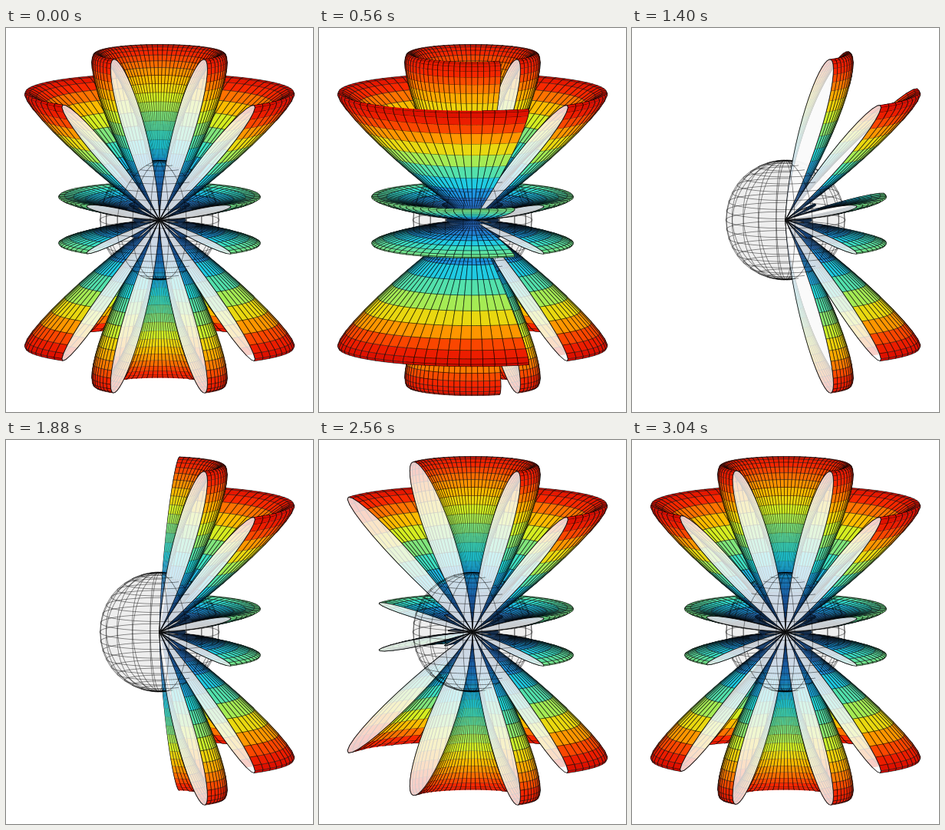
A matplotlib script that plays this animation: 400 px wide and 500 px high, repeating every 3.08 s.

```python
import numpy as np
import matplotlib.pyplot as plt
from matplotlib.animation import FuncAnimation
from matplotlib.collections import PathCollection
from matplotlib.colors import LinearSegmentedColormap
from matplotlib.patches import Circle
from matplotlib.path import Path

# Directivity of a 4.4 wavelength dipole, swept around its axis.
LENGTH = 4.4
SCALE = 74.9
SPHERE = 78
TILT = np.radians(8)
START = 45
SLICES = 71
STEP = 360 / SLICES
FRAMES = 77
RESTART = 24

CMAP = LinearSegmentedColormap.from_list("gain", [
    (0, "#2458a8"), (.2, "#2470c4"), (.32, "#1c9fe8"), (.42, "#22dce0"),
    (.55, "#74e58a"), (.66, "#d2f024"), (.75, "#fcc400"), (.83, "#ff8000"),
    (.91, "#f82800"), (1, "#d80c00")])


def gain(theta):
    t = np.clip(np.radians(theta), 1e-4, np.pi - 1e-4)
    k = np.pi * LENGTH
    return ((np.cos(k * np.cos(t)) - np.cos(k)) / np.sin(t)) ** 2


def project(r, theta, phi):
    """Spherical to screen; phi = 0 points at the viewer, 90 to the right."""
    t, p = np.radians(theta), np.radians(phi)
    rho, z = r * np.sin(t), r * np.cos(t)
    x = rho * np.sin(p)
    y = z * np.cos(TILT) - rho * np.cos(p) * np.sin(TILT)
    return np.stack(np.broadcast_arrays(x, y), axis=-1)


def wrap(angle):
    return np.abs((angle + 180) % 360 - 180)


def fan_key(theta, phi):
    """Angle to the viewer inside the half plane at phi."""
    p = np.radians(phi)
    view = np.degrees(np.arctan2(np.cos(p) * np.cos(TILT), np.sin(TILT)))
    return wrap(theta - view)


def in_minor_lobe(deg):
    return any(abs(deg - c) < 6 for c in (63, 90, 117))


# Lobe surface, coarser where the lobes are tiny
theta = np.array([d for i, d in enumerate(np.linspace(0, 180, 251))
                  if i % 2 == 0 or not in_minor_lobe(d)])
phi = START + STEP * np.arange(SLICES + 1)
radius = gain(theta)
peak = gain(np.linspace(1, 179, 2000)).max()
grid = project(SCALE * radius[:, None], theta[:, None], phi[None, :])
rows = len(theta) - 1

quads = np.stack([grid[:-1, :-1], grid[1:, :-1], grid[1:, 1:], grid[:-1, 1:]], axis=2)
d1 = quads[:, :, 2] - quads[:, :, 0]
d2 = quads[:, :, 3] - quads[:, :, 1]
outward = (d1[..., 0] * d2[..., 1] - d1[..., 1] * d2[..., 0] > 0).ravel()

mid_theta = (theta[1:] + theta[:-1]) / 2
mid_phi = phi[:-1] + STEP / 2
mid_radius = (radius[1:] + radius[:-1]) / 2
face_theta = np.repeat(mid_theta, SLICES)
face_phi = np.tile(mid_phi, rows)
face_slice = np.tile(np.arange(SLICES), rows)
face_rgba = np.repeat(CMAP(mid_radius / peak), SLICES, axis=0)
face_paths = [Path(q) for q in quads.reshape(-1, 4, 2)]

# Mesh lines fade where the cells get narrow
width = SCALE * mid_radius * np.sin(np.radians(mid_theta)) * np.radians(STEP)
face_edge = np.repeat(.68 * np.clip(width / 5, .1, 1), SLICES)

# Wire sphere, cut into short pieces
pieces = []
for m in range(20):
    for t in np.arange(0, 180, 4.5):
        pieces.append((t, t + 4.5, START + 18 * m, START + 18 * m))
for t in np.arange(9, 180, 9):
    for p in np.arange(0, 360, 9):
        pieces.append((t, t, START + p, START + p + 9))
t0, t1, p0, p1 = np.array(pieces).T
wire_paths = [Path(s) for s in np.stack([project(SPHERE, t0, p0),
                                         project(SPHERE, t1, p1)], axis=1)]
wire_theta = (t0 + t1) / 2
wire_dir = (p0 + p1) / 2
wire_slice = np.minimum((wire_dir - START) % 360 // STEP, SLICES - 1).astype(int)
buried = gain(wire_theta) * SCALE > SPHERE
wt, wp = np.radians(wire_theta), np.radians(wire_dir)
facing = np.sin(wt) * np.cos(wp) * np.cos(TILT) + np.cos(wt) * np.sin(TILT) > 0
wire_phi = mid_phi[wire_slice]

# Flat sections closing the sweep, one for each possible angle
cap_paths = [Path(np.vstack([grid[:, j], grid[:1, j]])) for j in range(SLICES + 1)]

paths = np.empty(len(face_paths) + len(wire_paths) + len(cap_paths), object)
paths[:] = face_paths + wire_paths + cap_paths
n_face, n_wire, n_cap = len(face_paths), len(wire_paths), len(cap_paths)
fills = np.vstack([face_rgba,
                   np.tile((0, 0, 0, 0), (n_wire, 1)),
                   np.tile((.98, .98, .98, .8), (n_cap, 1))]).astype(float)
edges = np.zeros((len(paths), 4))
edges[:, 3] = np.concatenate([face_edge, np.full(n_wire, .5), np.full(n_cap, .9)])

# Painter's order: by half plane around the axis, then by angle inside it
far = np.concatenate([wrap(face_phi), wrap(wire_phi), wrap(phi)])
near = np.concatenate([fan_key(face_theta, face_phi),
                       fan_key(wire_theta, wire_phi) + np.where(facing, -2, 2),
                       np.zeros(n_cap)])
order = np.lexsort((-near, -far))

fig = plt.figure(figsize=(4, 5), dpi=100, facecolor="white")
ax = fig.add_axes([0, 0, 1, 1])
ax.set_xlim(-200, 200)
ax.set_ylim(-250, 250)
ax.axis("off")
ax.add_patch(Circle((0, 0), SPHERE, facecolor="#eeeeee", edgecolor="none", zorder=0))
scene = PathCollection([], linewidths=.6, zorder=1)
ax.add_collection(scene, autolim=False)


def seen_through(cap):
    """Faces with a corner inside the section's outline."""
    hit = cap_paths[cap].contains_points(grid.reshape(-1, 2)).reshape(grid.shape[:2])
    return (hit[:-1, :-1] | hit[1:, :-1] | hit[1:, 1:] | hit[:-1, 1:]).ravel()


first_view = seen_through(0)


def draw(i):
    swept = min((i - RESTART) % FRAMES, SLICES)
    faces = outward.copy()
    caps = np.zeros(n_cap, bool)
    if swept < SLICES:
        faces |= first_view | seen_through(swept)
        caps[[0, swept]] = True
    faces &= face_slice < swept
    wires = ~(buried & (wire_slice < swept))
    shown = np.concatenate([faces, wires, caps])
    idx = order[shown[order]]
    scene.set_paths(list(paths[idx]))
    scene.set_facecolor(fills[idx])
    scene.set_edgecolor(edges[idx])
    return [scene]


anim = FuncAnimation(fig, draw, frames=FRAMES, interval=40, repeat=True)
plt.show()
```
